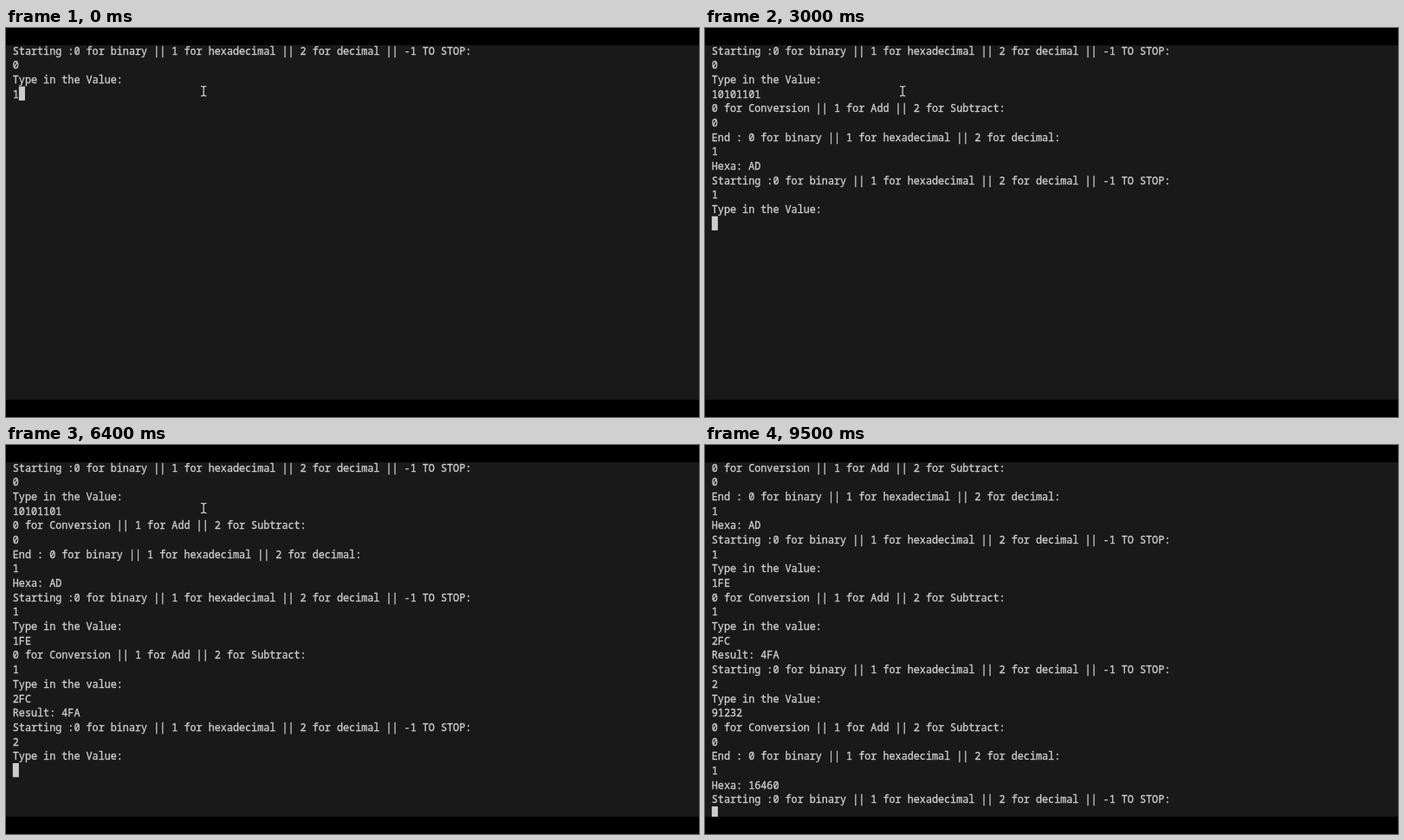
An HTML page with a canvas that plays this animation: 800 by 450 pixels, repeating every 9600 ms.

```html
<!DOCTYPE html>
<html lang="en">
<head>
<meta charset="utf-8">
<title>Number converter</title>
<style>
  html, body { margin: 0; width: 100%; height: 100%; overflow: hidden; background: #000; }
  canvas { display: block; width: 800px; height: 450px; }
</style>
</head>
<body>
<canvas id="stage" width="800" height="450"></canvas>
<script>
const ctx = document.getElementById('stage').getContext('2d');

const LOOP = 9600, ROWS = 25, POINTER_END = 9000;
const LEFT = 7.8, TOP = 17.5, CELL = 7.065, LINE = 16.69, BASE = 13;
const FG = '#cccccc', BG = '#191919';

const START = 'Starting :0 for binary || 1 for hexadecimal || 2 for decimal || -1 TO STOP:';
const MODE = '0 for Conversion || 1 for Add || 2 for Subtract:\n';
const END = 'End : 0 for binary || 1 for hexadecimal || 2 for decimal:\n';
const VALUE = 'Type in the Value:\n';

// [time, appended text]; a trailing \r puts the cursor at the line start
const steps = [
  [0, START + '\n0\n' + VALUE + '1'],
  [100, '0'], [200, '1'], [400, '0'], [500, '1'], [700, '1'], [800, '0'], [900, '1'],
  [1100, '\n'], [1200, MODE], [1500, '0'], [1600, '\n'], [1700, END],
  [2100, '1'], [2200, '\n'], [2300, 'Hexa: AD\n' + START + '\n'],
  [2700, '1'], [2800, '\n'], [2900, VALUE],
  [3500, '1'], [3700, 'F'], [4000, 'E\n'], [4100, MODE],
  [4300, '1'], [4400, '\n'], [4500, 'Type in the value:\n'],
  [4800, '2'], [5000, 'F'], [5200, 'C'], [5400, '\n'],
  [5500, 'Result: 4FA\n' + START + '\n'],
  [6000, '2'], [6200, '\n'], [6300, VALUE],
  [6700, '9'], [6900, '1'], [7100, '2'], [7300, '3'], [7500, '2'],
  [7700, '\n'], [7800, MODE], [8000, '0\n'], [8100, END],
  [8200, '1'], [8300, '\n'], [8400, 'Hexa: 16460\n' + START + '\r'], [8500, '\n']
];

// Spans in which the teal caret marker is visible
const markers = [[3800, 4000], [4800, 5100]];

const rowTop = row => TOP + row * LINE;

// A hairline stroke gives the text its slightly heavier weight
function drawText(str, col, row, color) {
  const x = LEFT + col * CELL, y = rowTop(row) + BASE;
  ctx.fillStyle = ctx.strokeStyle = color;
  ctx.lineWidth = 0.35;
  ctx.fillText(str, x, y);
  ctx.strokeText(str, x, y);
}

function drawCursor(col, row, char) {
  ctx.fillStyle = FG;
  ctx.fillRect(LEFT + col * CELL, rowTop(row), CELL, 16.3);
  if (char) drawText(char, col, row, '#555555');
}

function drawMarker(col, row) {
  const x = LEFT + (col + 1) * CELL - 0.4;
  const mid = rowTop(row) + 7.3;
  for (const dir of [-1, 1]) {
    ctx.save();
    ctx.translate(x, mid);
    ctx.scale(1, dir);
    ctx.beginPath();
    ctx.moveTo(0, 8);
    ctx.quadraticCurveTo(2, 10, 5, 10.5);
    ctx.bezierCurveTo(8, 12, 6, 17.6, 0, 17.6);
    ctx.bezierCurveTo(-6, 17.6, -8, 12, -5, 10.5);
    ctx.quadraticCurveTo(-2, 10, 0, 8);
    ctx.fillStyle = '#36a3ba';
    ctx.fill();
    ctx.strokeStyle = '#1f6f82';
    ctx.lineWidth = 0.8;
    ctx.stroke();
    ctx.restore();
  }
}

function drawPointer(x, y) {
  ctx.beginPath();
  for (const dir of [-1, 1]) {
    ctx.moveTo(x - 3.2, y + dir * 5.6);
    ctx.quadraticCurveTo(x, y + dir * 5.6, x, y + dir * 4);
    ctx.quadraticCurveTo(x, y + dir * 5.6, x + 3.2, y + dir * 5.6);
  }
  ctx.moveTo(x, y - 4.5);
  ctx.lineTo(x, y + 4.5);
  ctx.strokeStyle = '#c4c4c4';
  ctx.lineWidth = 1.4;
  ctx.stroke();
}

function draw(t) {
  const text = steps.filter(s => s[0] <= t).map(s => s[1]).join('');
  const lines = text.split('\n');
  const scroll = Math.max(0, lines.length - ROWS);
  const last = lines[lines.length - 1];
  const home = last.endsWith('\r');
  const col = home ? 0 : last.length;
  const row = lines.length - 1 - scroll;

  ctx.fillStyle = '#000';
  ctx.fillRect(0, 0, 800, 450);
  ctx.save();
  ctx.beginPath();
  ctx.rect(0, 20, 800, 410);
  ctx.clip();
  ctx.fillStyle = BG;
  ctx.fillRect(0, 20, 800, 410);

  ctx.font = `${CELL / 0.6}px "Noto Sans Mono", monospace`;
  ctx.lineJoin = 'round';
  lines.slice(scroll).forEach((line, i) => drawText(line.replace('\r', ''), 0, i, FG));
  if (markers.some(([from, to]) => t >= from && t < to)) drawMarker(col, row);
  drawCursor(col, row, home && last[0]);
  if (t < POINTER_END) drawPointer(228.2, 73);
  ctx.restore();
}

const begin = performance.now();
function tick() {
  draw((performance.now() - begin) % LOOP);
  requestAnimationFrame(tick);
}
tick();
</script>
</body>
</html>
```
